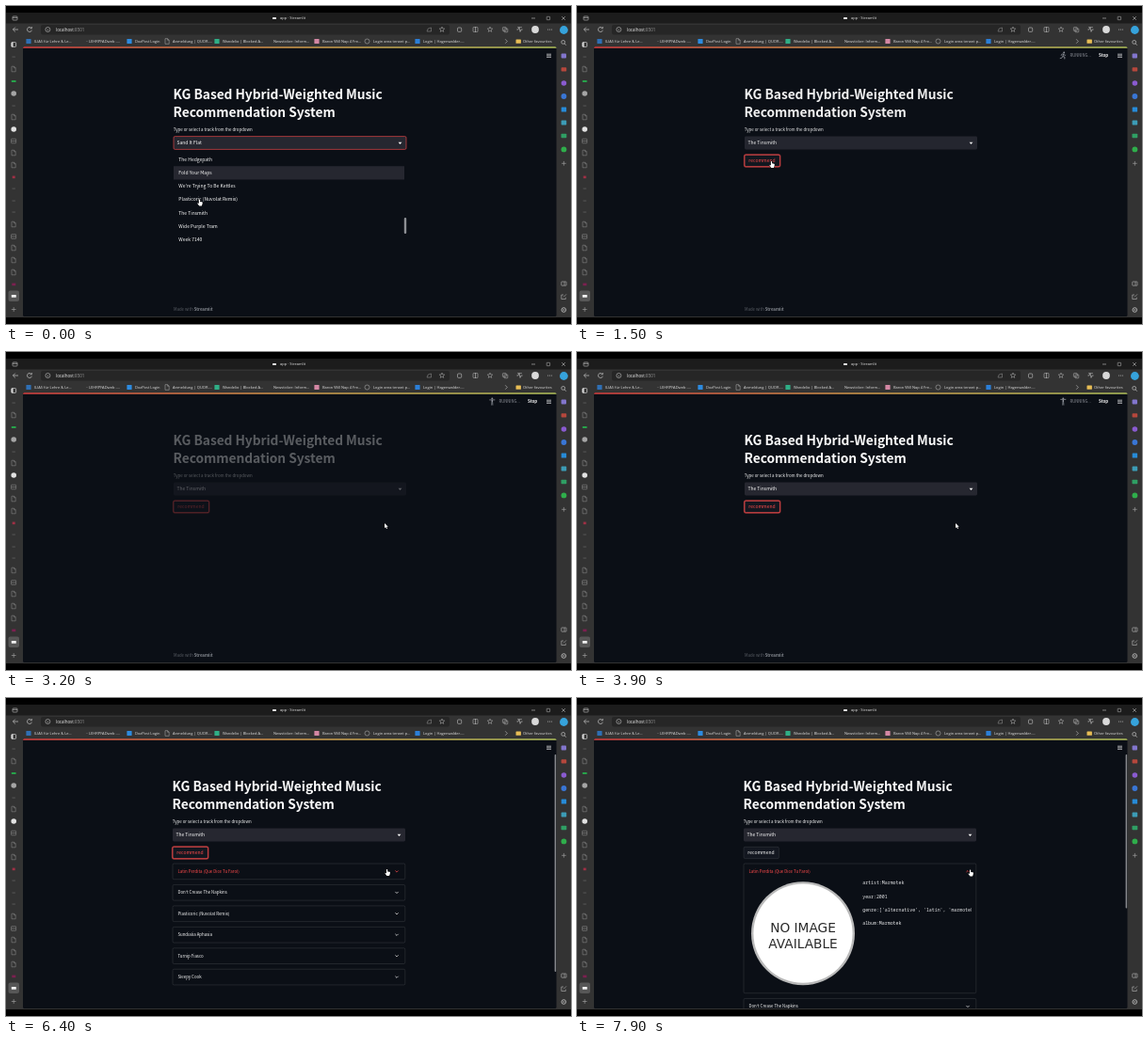
Animation of 600x338 px, one loop 8000 ms. Source, as an HTML page with a canvas:

```html
<!DOCTYPE html>
<html lang="en">
<head>
<meta charset="utf-8">
<title>app · Streamlit</title>
<style>
html, body { margin: 0; width: 100%; height: 100%; overflow: hidden; background: #000; }
canvas { display: block; width: 600px; height: 338px; }
</style>
</head>
<body>
<canvas id="stage"></canvas>
<script>
const W = 600, H = 338, LOOP = 8000;
const canvas = document.getElementById('stage');
const ratio = window.devicePixelRatio || 1;
canvas.width = W * ratio;
canvas.height = H * ratio;
const c = canvas.getContext('2d');

const SANS = '"Noto Sans CJK JP", "Noto Sans CJK SC", "Noto Sans", sans-serif';
const UI = '"Open Sans", "Noto Sans", sans-serif';
const MONO = '"Noto Sans Mono", "DejaVu Sans Mono", monospace';
const RED = '#ff4b4b', WHITE = '#fafafa', PAGE = '#0b0f16', FIELD = '#262730';

const TRACKS = ['The Hedgepath', 'Fold Your Maps', "We're Trying To Be Kettles",
  'Plasticoric (Nuvolat Remix)', 'The Tinsmith', 'Wide Purple Tram', 'Week 7140'];
const RESULTS = ['Latin Perdita (Que Dice Tu Farol)', "Don't Crease The Napkins",
  'Plasticoric (Nuvolat Remix)', 'Sundialia Aphasia', 'Turnip Fiasco', 'Sleepy Cook'];
const SHOWN_AT = [4200, 4500, 4800, 4900, 5000, 5200];

// time, x, y of the pointer tip
const PATH = [[0, 204.8, 205.5], [100, 204.8, 205.5], [500, 209, 218], [700, 209, 218],
  [950, 204, 164], [1600, 206, 165], [2000, 224.5, 168], [2300, 236, 170], [3100, 402, 182],
  [3900, 402, 182], [4200, 404, 182], [7200, 404, 182], [7600, 417, 182.5], [8000, 417, 182.5]];

const clamp = v => Math.max(0, Math.min(1, v));
const span = (t, a, b) => clamp((t - a) / (b - a));
const smooth = p => p * p * (3 - 2 * p);
const mix = (a, b, p) => a + (b - a) * p;

function rect(x, y, w, h, fill, r = 0) {
  c.beginPath();
  c.roundRect(x, y, w, h, r);
  c.fillStyle = fill;
  c.fill();
}
function frame(x, y, w, h, color, lw = 0.6, r = 1.4) {
  c.beginPath();
  c.roundRect(x, y, w, h, r);
  c.strokeStyle = color;
  c.lineWidth = lw;
  c.stroke();
}
function disc(x, y, r, fill) {
  c.beginPath();
  c.arc(x, y, r, 0, 7);
  c.fillStyle = fill;
  c.fill();
}
function ring(x, y, r, color, lw = 0.6) {
  c.beginPath();
  c.arc(x, y, r, 0, 7);
  c.strokeStyle = color;
  c.lineWidth = lw;
  c.stroke();
}
function line(color, lw, ...p) {
  c.beginPath();
  for (let i = 0; i < p.length; i += 2) c.lineTo(p[i], p[i + 1]);
  c.strokeStyle = color;
  c.lineWidth = lw;
  c.stroke();
}
// y is the middle of the capitals
function text(s, x, y, size, color = WHITE, font = SANS, weight = 400) {
  c.font = `${weight} ${size}px ${font}`;
  c.fillStyle = color;
  c.fillText(s, x, y + size * 0.365);
}
function plus(x, y, r) {
  line('#aaa', 0.6, x - r, y, x + r, y);
  line('#aaa', 0.6, x, y - r, x, y + r);
}
function sheet(x, y, color = '#8b8b8b') {
  line(color, 0.55, x + 0.6, y - 2.8, x - 2, y - 2.8, x - 2, y + 2.8, x + 2.2, y + 2.8,
    x + 2.2, y - 1.2, x + 0.6, y - 2.8, x + 0.6, y - 1.2, x + 2.2, y - 1.2);
}
function star(x, y, r) {
  const p = [];
  for (let i = 0; i <= 10; i++) {
    const a = i * Math.PI / 5 - Math.PI / 2, q = i % 2 ? r * 0.45 : r;
    p.push(x + q * Math.cos(a), y + q * Math.sin(a));
  }
  line('#bbb', 0.5, ...p);
}

function topBars() {
  rect(0, 7.5, W, 323.5, '#333333');
  rect(0, 7.5, W, 11, '#1c1c1c');
  const g = '#c4c4c4';
  frame(7, 11, 5, 4, g, 0.6, 0.8);
  line(g, 0.6, 7, 12.4, 12, 12.4);
  rect(283, 12, 4, 2, '#e5e5e5', 0.5);
  text('app · Streamlit', 291, 13, 4, '#e4e4e4', UI);
  line(g, 0.6, 558, 13, 562, 13);
  frame(574.2, 11.3, 3.4, 3.4, g, 0.5, 0.4);
  line(g, 0.6, 590.3, 11.2, 593.8, 14.8);
  line(g, 0.6, 593.8, 11.2, 590.3, 14.8);

  rect(37, 20, 434, 10.4, '#262626', 2);
  line(g, 0.7, 13, 25, 7.4, 25, 9.8, 22.6);
  line(g, 0.7, 7.4, 25, 9.8, 27.4);
  c.beginPath();
  c.arc(25, 25, 2.5, 0.3, 5.6);
  c.strokeStyle = g;
  c.lineWidth = 0.7;
  c.stroke();
  line(g, 0.6, 27.6, 22, 27.4, 23.9, 25.4, 23.8);
  ring(44.4, 25, 2.5, g);
  line(g, 0.6, 44.4, 24.6, 44.4, 26.3);
  text('localhost', 53, 25, 4.5, '#eeeeee', UI);
  const w = c.measureText('localhost').width;
  text(':8501', 53 + w, 25, 4.5, '#999', UI);
  line('#999', 0.5, 447, 27, 448.2, 24, 451.5, 23, 451.5, 27, 447, 27);
  star(463, 25, 2.9);
  frame(479.5, 23, 4.2, 4.4, g, 0.6, 1);
  frame(496, 22.6, 5, 4.8, g, 0.5, 0.5);
  line(g, 0.6, 498.5, 22, 498.5, 28);
  star(514, 25, 2.9);
  frame(527.4, 22.6, 3.8, 3.8, g, 0.5, 0.6);
  frame(529, 24, 3.8, 3.8, g, 0.5, 0.6);
  line(g, 0.6, 542.4, 25, 544, 25, 545, 22.6, 546, 27.4, 547, 25, 548.6, 25);
  line(g, 0.5, 543, 22.6, 548, 22.6);
  disc(562, 25, 3.9, '#d9d9d9');
  for (let i = -1; i < 2; i++) disc(577.5 + i * 1.9, 25, 0.5, g);

  const marks = [[30, 'ILIAS für Lehre & Le...', '#2f6fb5'], [88, 'LEHRPFADweb -...', 0],
    [137, 'DozPost Login', '#2d8be0'], [177, 'Anmeldung | QUOR-...', 'page'],
    [230, 'Wandelio | Blocked A...', '#2fae86'], [284, 'Newsticker: Inform...', 0],
    [336, 'Baron Will Nap 4 Fre...', '#d487a4'], [390, 'Login area tenant p...', 'ring'],
    [443, 'Login | Hagenwalder-...', '#2b7fd8']];
  for (const [x, s, icon] of marks) {
    if (icon === 'page') sheet(x - 6, 37.5, '#aaa');
    else if (icon === 'ring') ring(x - 6.5, 37.5, 2.5, '#aaa');
    else if (icon) rect(x - 8.6, 34.9, 5.2, 5.2, icon, 0.6);
    text(s, x, 37.5, 4, '#dedede', UI);
  }
  disc(86, 37.5, 0.4, '#aaa');
  line(g, 0.6, 530.2, 35.3, 532.3, 37.5, 530.2, 39.7);
  rect(541.5, 35.4, 5.4, 4.4, '#e8bd55', 0.6);
  text('Other favourites', 549, 37.5, 4, '#dedede', UI);
}

function sideBars() {
  frame(5.8, 38.6, 4.8, 4.8, '#ddd', 0.7, 0.8);
  rect(5.8, 38.6, 1.7, 4.8, '#ddd');
  for (const y of [67, 118, 156, 169, 232, 257, 270, 283]) sheet(8, y);
  for (const y of [54, 106, 194, 207, 219]) rect(6.5, y - 0.4, 3.4, 0.9, '#5b5b5b');
  rect(5.8, 79, 4.8, 2, '#27a34a', 0.6);
  disc(8.2, 93, 2.8, '#a5a5a5');
  disc(8.2, 131, 2.8, '#e2e2e2');
  for (const y of [143.5, 245]) {
    frame(5.6, y - 2.3, 5, 4.6, '#999', 0.5, 0.4);
    line('#999', 0.5, 5.6, y, 10.6, y);
  }
  rect(6.7, 180.6, 3, 2.6, '#a03045');
  rect(6.3, 294.6, 4, 2.6, '#7c2050');
  rect(2.5, 302.6, 11.5, 11.4, '#575757', 2);
  rect(5.8, 307, 5, 2.8, '#f3f3f3', 0.6);
  plus(8.2, 322.5, 2.4);

  disc(592.4, 25.5, 4.4, '#36a3dc');
  ring(591.7, 38.4, 1.9, '#c8c8c8', 0.7);
  line('#c8c8c8', 0.7, 593, 39.8, 594.8, 41.7);
  rect(589.6, 50.6, 5.4, 4.8, '#8275cc', 1);
  rect(589.6, 65.2, 5.6, 4.4, '#b5473c', 0.8);
  disc(592.4, 82, 2.8, '#8a5bd0');
  disc(592.4, 96, 2.9, '#3976d5');
  rect(589.7, 107.4, 5.4, 5.2, '#278bd8', 0.6);
  rect(589.6, 121.6, 5.6, 5, '#3c9cb6', 0.8);
  rect(589.5, 135.8, 5.8, 4.4, '#2f9f64', 0.8);
  disc(592.4, 152.4, 2.9, '#2fae4b');
  plus(592.4, 167.3, 2.4);
  frame(589.8, 293, 5.2, 4.2, '#bbb', 0.6, 0.5);
  line('#bbb', 0.6, 593, 293, 593, 297);
  line('#bbb', 0.6, 592, 307, 589.8, 307, 589.8, 311.5, 594.3, 311.5, 594.3, 309.6);
  line('#bbb', 0.6, 592, 309.4, 595, 306.4);
  ring(592.3, 323, 2.3, '#bbb', 0.9);
  disc(592.3, 323, 0.8, '#bbb');
}

function runner(x, y, t) {
  const col = '#8f929a', pose = Math.floor(t / 100) % 16 === 15;
  const run = t >= 4300 || pose;
  const k = Math.floor(t / 100) % 2 ? 0.5 : 0;
  disc(x + (run ? 0.9 : 0), y - 3.1, 0.95, col);
  if (run) {
    line(col, 0.9, x + 0.5, y - 1.7, x - 0.5, y + 0.9, x + 1.6, y + 1.6, x + 1 + k, y + 3.8);
    line(col, 0.8, x - 0.5, y + 0.9, x - 1.3, y + 2.5, x - 3 - k, y + 3);
    line(col, 0.7, x - 2.2, y - 0.2 + k, x - 1.4, y - 1.6, x + 0.5, y - 1.6, x + 1.6, y, x + 2.8, y - 0.6);
  } else {
    line(col, 0.8, x - 3, y - 1.7 - k, x + 3, y - 1.7 - k);
    line(col, 1.5, x, y - 1.6, x, y + 1);
    line(col, 0.7, x - 0.4, y + 0.8, x - 0.6, y + 4);
    line(col, 0.7, x + 0.4, y + 0.8, x + 0.6, y + 4);
  }
}

function chevron(x, y, color, up) {
  const d = up ? -0.8 : 0.8;
  line(color, 0.7, x - 1.6, y - d, x, y + d, x + 1.6, y - d);
}

function dropdown(t) {
  const row = t < 100 ? 1 : t < 250 ? 3 : 4;
  rect(178, 170.3 + (row - 1) * 14.1, 245, 14.1, FIELD);
  TRACKS.forEach((s, i) => text(s, 183.3, 163.3 + i * 14.1, 5.03));
  rect(422.8, 225, 2.4, 17, '#8d8f94', 1.1);
}

function button(t) {
  const hover = span(t, 830, 900);
  const red = hover * (1 - smooth(span(t, 6400, 7200)));
  const focus = t >= 950 ? red : 0;
  const tint = `rgb(${mix(250, 255, red)},${mix(250, 75, red)},${mix(250, 75, red)})`;
  rect(178, 158.3, 37.4, 12.3, '#131720', 1.4);
  frame(178, 158.3, 37.4, 12.3, 'rgba(250,250,250,.17)', 0.5);
  if (red) frame(178, 158.3, 37.4, 12.3, `rgba(255,75,75,${red})`, 0.6);
  if (focus) frame(177.5, 157.8, 38.4, 13.3, `rgba(255,75,75,${focus * 0.55})`, 1.2, 2);
  text('recommend', 182.3, 164.4, 5.03, tint);
}

function details(open) {
  c.save();
  c.beginPath();
  c.rect(178, 192.7, 246, Math.max(0, open * 121));
  c.clip();
  disc(241, 250.2, 55, '#b9b9b9');
  disc(241, 250.2, 52.6, '#fff');
  c.textAlign = 'center';
  text('NO IMAGE', 241, 244, 13.7, '#2b2b2b', '"DejaVu Sans", sans-serif');
  text('AVAILABLE', 241, 261, 13.7, '#2b2b2b', '"DejaVu Sans", sans-serif');
  c.textAlign = 'left';
  c.beginPath();
  c.rect(300, 190, 119.8, 130);
  c.clip();
  ['artist:Marmotek', 'year:2001', "genre:['alternative', 'latin', 'marmotek']", 'album:Marmotek']
    .forEach((s, i) => text(s, 304.2, 196.6 + i * 14.2, 4.93, '#e6e7e9', MONO));
  c.restore();
}

function results(t, open) {
  RESULTS.forEach((s, i) => {
    if (t < SHOWN_AT[i]) return;
    const y = 184.3 + i * 22.45 + (i ? open * 121 : 0);
    const color = i ? WHITE : RED;
    frame(178, y - 8.3, 246.8, 16.7 + (i ? 0 : open * 121), 'rgba(250,250,250,.19)', 0.5);
    text(s, 183.4, y, 4.4, color);
    chevron(416, y, color, !i && open > 0);
  });
  if (open) details(open);
}

function page(t) {
  c.save();
  c.beginPath();
  c.roundRect(18, 43, 566.5, 287, 1.5);
  c.clip();
  rect(18, 43, 567, 288, PAGE);
  const bar = c.createLinearGradient(18, 0, 584, 0);
  bar.addColorStop(0, '#e04545');
  bar.addColorStop(0.5, '#d9a050');
  bar.addColorStop(1, '#b9c860');
  rect(18, 43.2, 567, 1.5, bar);

  const scrolls = t >= 5000;
  const open = t < 7250 ? 0 : 1 - Math.pow(1 - span(t, 7250, 7850), 4);
  const fade = Math.pow(span(t, 1300, 2400), 1.65);
  c.save();
  if (scrolls) c.translate(-1, 0);
  c.globalAlpha = t < 3800 ? mix(1, 0.33, fade) : 1;
  c.letterSpacing = '-0.07px';
  text('KG Based Hybrid-Weighted Music', 177.6, 94.3, 13.8, WHITE, SANS, 700);
  text('Recommendation System', 177.6, 113, 13.8, WHITE, SANS, 700);
  c.letterSpacing = '0px';
  text('Type or select a track from the dropdown', 177.8, 131.6, 4.4);

  rect(178, 138.6, 247, 13.8, FIELD, 1.4);
  if (t < 950) frame(178, 138.6, 247, 13.8, RED, 0.6);
  const pick = t < 700 ? 'Sand It Flat' : TRACKS[4];
  text(pick, 181.4, 145.6, 5.03);
  if (t >= 700 && t < 950) {
    const x = 182 + c.measureText(pick).width;
    line('#ddd', 0.5, x, 142.6, x, 148.6);
  }
  c.beginPath();
  c.moveTo(416.6, 144.7);
  c.lineTo(420.4, 144.7);
  c.lineTo(418.5, 146.9);
  c.fillStyle = WHITE;
  c.fill();

  if (t < 700) dropdown(t);
  else button(t);
  c.globalAlpha = 1;
  results(t, open);
  c.restore();

  if (!scrolls) {
    text('Made with ', 178, 322.3, 4.3, '#585c63');
    text('Streamlit', 178 + c.measureText('Made with ').width, 322.3, 4.3, '#858990', SANS, 700);
  } else {
    rect(582.6, 60, 1.7, mix(231, 163.5, open), '#85878b', 0.8);
  }
  for (let i = -1; i < 2; i++) line('#e2e3e5', 0.7, 574, 52.8 + i * 1.6, 579, 52.8 + i * 1.6);
  if (t >= 1200 && t < 5400) {
    runner(516.3, 52.6, t);
    text('RUNNING...', 523.5, 52.7, 4.2, '#8f929a');
    text('Stop', 554, 52.7, 4.5, WHITE, SANS, 700);
  }
  c.restore();
}

function pointer(t) {
  const i = Math.max(1, PATH.findIndex(p => p[0] > t));
  const [a, b] = [PATH[i - 1], PATH[i]];
  const p = smooth(span(t, a[0], b[0]));
  const arrow = (t > 720 && t < 860) || (t > 2080 && t < 4200);
  c.save();
  c.translate(mix(a[1], b[1], p), mix(a[2], b[2], p));
  const shape = arrow
    ? [0, 0, 0, 5.2, 1.2, 4.1, 2.1, 6, 3, 5.6, 2.2, 3.8, 3.8, 3.8]
    : [0, 0.3, 0.6, 0, 1.2, 0.3, 1.2, 2.4, 3.5, 2.8, 4, 3.5, 3.6, 5.6, 3, 7, 0.4, 7, -1.5, 4.4, -1.2, 3.8, 0, 4.5];
  c.beginPath();
  for (let k = 0; k < shape.length; k += 2) c.lineTo(shape[k], shape[k + 1]);
  c.closePath();
  c.lineJoin = 'round';
  c.strokeStyle = '#000';
  c.lineWidth = 0.8;
  c.stroke();
  c.fillStyle = '#fff';
  c.fill();
  c.restore();
}

function draw(now) {
  const t = now % LOOP;
  c.setTransform(ratio, 0, 0, ratio, 0, 0);
  rect(0, 0, W, H, '#000');
  topBars();
  sideBars();
  page(t);
  pointer(t);
}

const start = performance.now();
function tick() {
  draw(performance.now() - start);
  requestAnimationFrame(tick);
}
tick();
</script>
</body>
</html>
```
